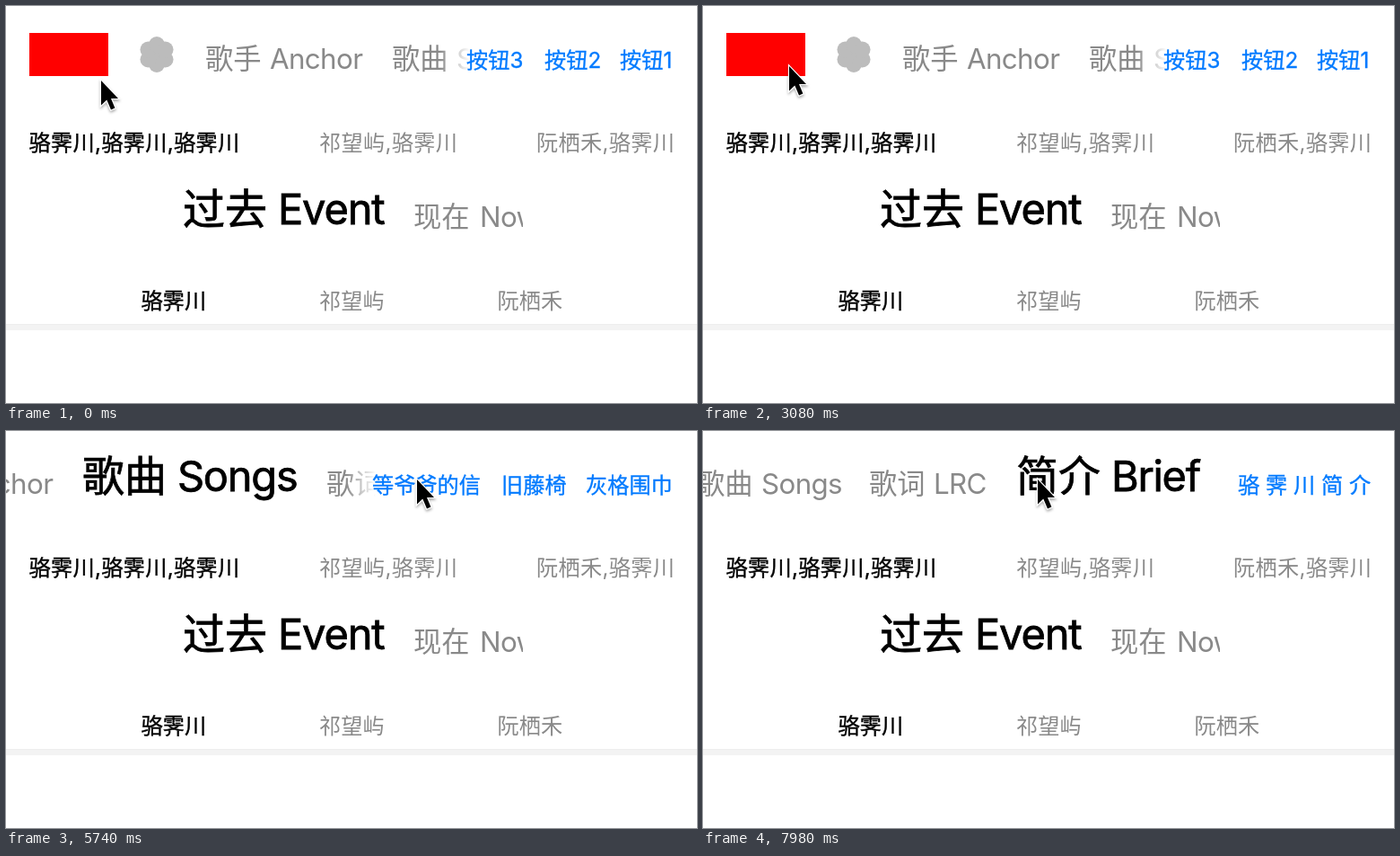
Recreate the animation shown at these times as an HTML page. Size 770 by 442 pixels, loop 8 s.

```html
<!DOCTYPE html>
<html lang="zh-CN">
<head>
<meta charset="utf-8">
<title>Tabs</title>
<style>
  html, body { margin: 0; width: 100%; height: 100%; overflow: hidden; background: #fff; }
  svg { display: block; width: 100vw; height: 100vh; }
  text { font-family: Inter, "Noto Sans CJK SC", "Noto Sans CJK", sans-serif; font-size: 24.2px; fill: #898989; }
  .names { letter-spacing: .3px; }
  .tab { font-size: 31.3px; }
  .big { font-size: 47px; }
  .latin { letter-spacing: -.025em; }
  .tab .latin { letter-spacing: -.02em; word-spacing: .04em; }
  .on { fill: #000; stroke: #000; stroke-width: .016em; }
  .btn { fill: #007aff; stroke: #007aff; stroke-width: .014em; }
</style>
</head>
<body>
<svg viewBox="0 0 770 442">
  <defs>
    <linearGradient id="veil">
      <stop offset="0" stop-color="#fff" stop-opacity="0"/>
      <stop offset="1" stop-color="#fff"/>
    </linearGradient>
    <clipPath id="cut"><rect x="190" y="190" width="386" height="80"/></clipPath>
    <filter id="soft" x="-50%" y="-50%" width="200%" height="200%">
      <feDropShadow dx="0" dy="2" stdDeviation="1.5" flood-opacity=".35"/>
    </filter>
  </defs>
  <rect width="770" height="442" fill="#fff"/>

  <g id="tabs">
    <rect id="block"/>
    <g id="flower"><circle r="11"/></g>
  </g>
  <g id="cover">
    <rect x="-30" width="34" height="110" fill="url(#veil)"/>
    <rect x="4" width="770" height="110" fill="#fff"/>
  </g>
  <g id="buttons"></g>

  <g class="names">
    <text class="on" x="25.5" y="160.6">骆霁川,骆霁川,骆霁川</text>
    <text x="349" y="160.6">祁望屿,骆霁川</text>
    <text x="591" y="160.6">阮栖禾,骆霁川</text>
  </g>
  <g clip-path="url(#cut)">
    <text class="big on" x="197" y="242.8">过去<tspan class="latin"> Event</tspan></text>
    <text class="tab" x="454" y="246.3">现在<tspan class="latin" dx="2"> Now</tspan></text>
  </g>
  <text class="on" x="150.5" y="336.6">骆霁川</text>
  <text x="349" y="336.6">祁望屿</text>
  <text x="547.5" y="336.6">阮栖禾</text>
  <rect y="354" width="770" height="7" fill="#f3f3f3"/>
  <rect y="354" width="770" height="1" fill="#ededed"/>

  <circle id="ring" fill="none" stroke="#aecdfb" stroke-width="5"/>
  <path id="cursor" d="M1 1V28.5L7.3 22.6 12 33.4 16.4 31.4 12 21H20Z"
    stroke="#fff" stroke-width="2.2" paint-order="stroke" filter="url(#soft)"/>
</svg>
<script>
const LOOP = 8000, SLIDE = 260, GAP = 32;
const NS = 'http://www.w3.org/2000/svg';
const $ = id => document.getElementById(id);
const clamp = v => Math.max(0, Math.min(1, v));
const mix = (a, b, p) => a + (b - a) * p;
const ease = p => { p = clamp(p); return p * p * (3 - 2 * p); };

function add(parent, tag, attrs, text = '') {
  const el = document.createElementNS(NS, tag);
  set(el, attrs);
  el.textContent = text;
  parent.append(el);
  return el;
}
function set(el, attrs) {
  for (const k in attrs) el.setAttribute(k, attrs[k]);
}
function gray(from, to, p) {
  const v = Math.round(mix(from, to, p));
  return `rgb(${v},${v},${v})`;
}

// normal and selected width of each tab, in order
const widths = [[68, 88], [44, 60], [176, 264], [160, 240], [132, 197], [136, 204]];
// strip scroll while each tab is selected
const scrolls = [0, 0, 92, 325, 503, 417];
const titles = [['歌手', 'Anchor'], ['歌曲', 'Songs'], ['歌词', 'LRC'], ['简介', 'Brief']];
const buttons = [
  [[513, '按钮3'], [600, '按钮2'], [684, '按钮1']],
  [[484, '按 钮 6'], [582, '按钮5'], [668, '按 钮 4']],
  [[482, '阮栖禾'], [577, '祁望屿'], [672, '骆霁川']],
  [[408, '等爷爷的信'], [552, '旧藤椅'], [646, '灰格围巾']],
  [[382, '笑声盘旋半山腰'], [574, '你突然释怀的笑']],
  [[596, '骆 霁 川 简 介']]
];
// time, selected tab
const clicks = [[-LOOP, 0], [1500, 1], [2590, 0], [3420, 1], [4420, 2], [5250, 3], [6600, 4], [7480, 5]];
// time, x, y of the pointer tip
const path = [
  [0, 105, 82], [1050, 105, 80], [1360, 165, 42], [1650, 165, 42],
  [2240, 104, 65], [2310, 103, 65], [2480, 54, 56], [2700, 54, 56],
  [3080, 95, 66], [3300, 165, 42], [3620, 165, 42], [4180, 287, 60],
  [4600, 287, 60], [5080, 457, 53], [5800, 457, 53], [6400, 368, 53],
  [7100, 366, 53], [7560, 366, 53], [7800, 372, 53], [8000, 372, 53]
];

for (let i = 0; i < 6; i++) {
  const a = Math.PI / 6 + i * Math.PI / 3;
  add($('flower'), 'circle', { cx: 11 * Math.cos(a), cy: 11 * Math.sin(a), r: 9 });
}
const labels = titles.map(([han, word]) => {
  const el = add($('tabs'), 'text', { class: 'tab' }, han);
  const latin = add(el, 'tspan', { class: 'latin' }, ' ' + word);
  return { el, latin };
});
const sets = buttons.map(list => {
  const g = add($('buttons'), 'g', {});
  list.forEach(([x, s]) => add(g, 'text', { class: 'btn', x, y: 69.2 }, s));
  return g;
});

function drawTabs(t) {
  let n = clicks.length - 1;
  while (clicks[n][0] > t) n--;
  const now = clicks[n][1], was = clicks[Math.max(0, n - 1)][1];
  const p = ease((t - clicks[n][0]) / SLIDE);
  let x = 26 - mix(scrolls[was], scrolls[now], p);

  widths.forEach(([small, large], i) => {
    const k = mix(+(was === i), +(now === i), p);
    const w = mix(small, large, k);
    if (i === 0) {
      const h = mix(38, 48, k);
      set($('block'), { x, y: 78 - h, width: w, height: h, fill: now === 0 ? '#f00' : '#1400ff' });
    } else if (i === 1) {
      set($('flower'), {
        transform: `translate(${x + w / 2} ${mix(54, 46, k)}) scale(${mix(1, 1.3, k)})`,
        fill: gray(188, 46, k)
      });
    } else {
      const { el, latin } = labels[i - 2];
      const color = gray(137, 0, k);
      set(el, {
        transform: `translate(${x} ${mix(70.3, 66.8, k)}) scale(${mix(1, 1.5, k)})`,
        stroke: color, 'stroke-width': .5 * k
      });
      el.style.fill = color;
      // larger text is set tighter
      latin.style.letterSpacing = mix(-.02, -.025, k) + 'em';
      latin.style.wordSpacing = mix(.04, 0, k) + 'em';
    }
    x += w + GAP;
  });

  sets.forEach((g, i) => set(g, { display: i === now ? 'inline' : 'none' }));
  set($('cover'), { transform: `translate(${buttons[now][0][0]} 0)` });
}

function drawPointer(t) {
  let n = 0;
  while (n < path.length - 2 && path[n + 1][0] <= t) n++;
  const a = path[n], b = path[n + 1];
  const p = ease((t - a[0]) / (b[0] - a[0]));
  const x = mix(a[1], b[1], p), y = mix(a[2], b[2], p);
  set($('cursor'), { transform: `translate(${x} ${y})` });

  // ring shows around each press and fades on release
  let glow = 0;
  for (const [at] of clicks) {
    const d = t - at;
    if (d > -140 && d < 100) glow = Math.min(clamp((d + 140) / 50), clamp((100 - d) / 100));
  }
  set($('ring'), { cx: x - 1, cy: y + 1, r: 39.5, opacity: glow });
}

const start = performance.now();
function frame() {
  const t = (performance.now() - start) % LOOP;
  drawTabs(t);
  drawPointer(t);
  requestAnimationFrame(frame);
}
frame();
</script>
</body>
</html>
```
